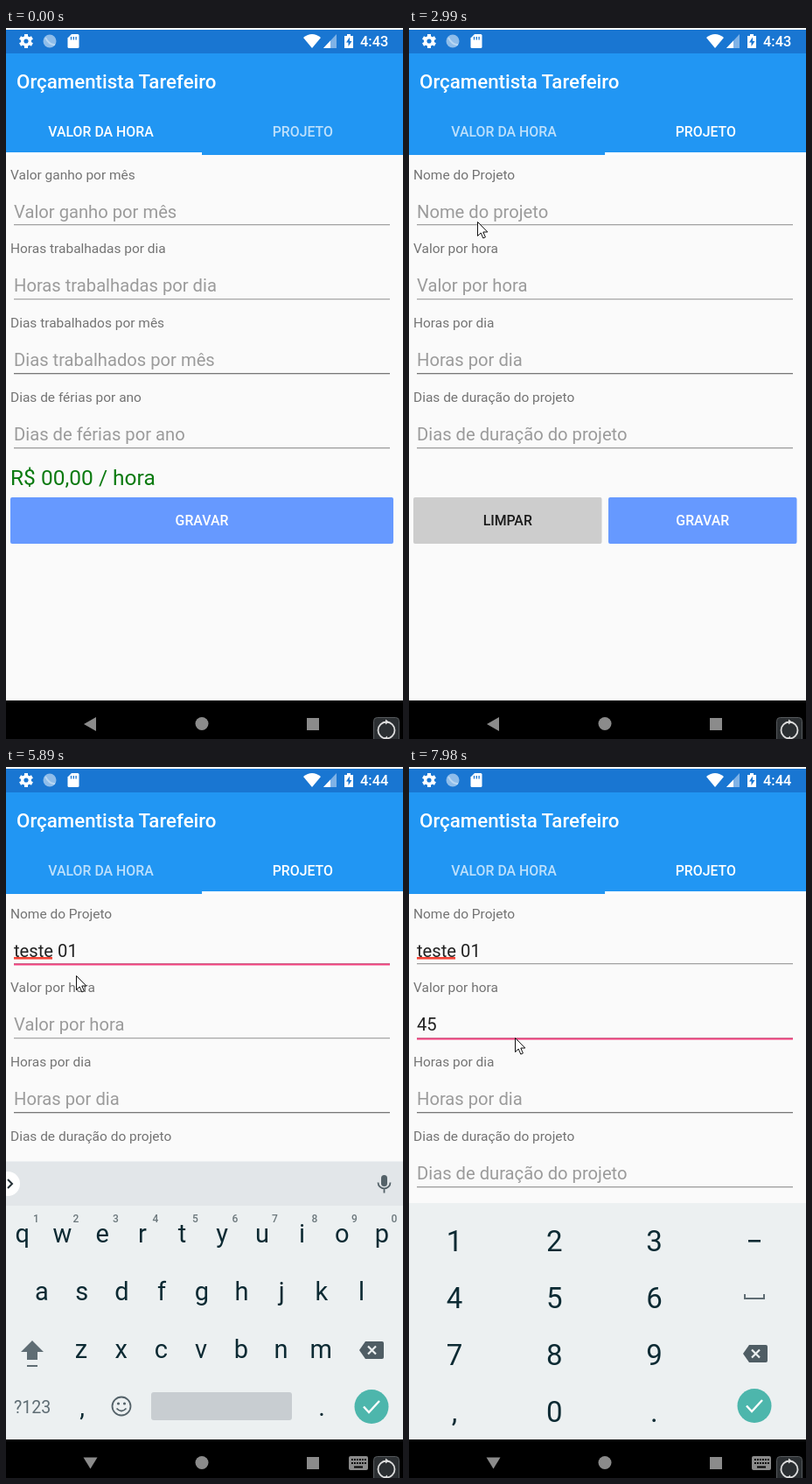
An HTML page for the animation above (8 s loop, 454 by 812 pixels).

```html
<!DOCTYPE html>
<html lang="pt">
<head>
<meta charset="utf-8">
<title>Orçamentista Tarefeiro</title>
<style>
html, body { margin: 0; width: 100%; height: 100%; overflow: hidden; background: #fafafa; }
svg { display: block; }
text { font-family: Roboto, sans-serif; white-space: pre; }
.med { font-weight: 500; font-size: 15.85px; }
.mid { text-anchor: middle; }
.label { font-size: 15.47px; fill: #737373; }
.hint { font-size: 20.2px; fill: #9b9b9b; }
.typed { font-size: 20.2px; fill: #212121; }
.key { font-size: 29px; fill: #0c2a33; }
.digit { font-size: 33px; fill: #0c2a33; }
.sup { font-size: 12px; font-weight: 500; fill: #6b777c; }
</style>
</head>
<body>
<svg id="stage" width="454" height="812" viewBox="0 0 454 812"></svg>
<script>
const rect = (x, y, w, h, fill, more = '') =>
  `<rect x="${x}" y="${y}" width="${w}" height="${h}" fill="${fill}" ${more}/>`;
const circle = (x, y, r, fill, more = '') => `<circle cx="${x}" cy="${y}" r="${r}" fill="${fill}" ${more}/>`;
const path = (d, fill, more = '') => `<path d="${d}" fill="${fill}" ${more}/>`;
const line = (d, color, w = 2, more = '') => path(d, 'none', `stroke="${color}" stroke-width="${w}" ${more}`);
const text = (x, y, s, cls, more = '') => `<text x="${x}" y="${y}" class="${cls}" ${more}>${s}</text>`;
const group = (id, s) => `<g id="${id}">${s}</g>`;

const textY = i => Math.floor(i * 84.7);
const lineY = i => Math.round(i * 84.9);
const lineColors = ['#a3a3a3', '#a8a8a8', '#777', '#9c9c9c'];

function form(id, names, hints) {
  return names.map((s, i) =>
    text(5, 173 + textY(i), s, 'label') + text(9, 217 + textY(i), hints[i], 'hint', `id="${id}Hint${i}"`) +
    rect(9, 224 + lineY(i), 430, 1.3, lineColors[i])).join('');
}

const button = (x, w, s, fill, color) =>
  rect(x, 536, w, 53, fill, 'rx="2"') + text(x + w / 2, 568, s, 'med mid', `fill="${color}"`);

const erase = (x, y) =>
  path(`M${x - 14} ${y}l7-10h19q2 0 2 2v16q0 2-2 2h-19z`, '#4f5d64') +
  line(`M${x - 4} ${y - 4.5}l9 9m0-9l-9 9`, '#ecf0f1', 2.2);

const done = (x, y) =>
  circle(x, y, 19.5, '#4db6ac') + line(`M${x - 9} ${y}l6 6.5l12-13`, '#fff', 2.4);

function statusBar() {
  let gear = '';
  for (let a = 0; a < 360; a += 60)
    gear += rect(21, 7, 4, 5, '#fff', `transform="rotate(${a} 23 15)"`);
  return rect(0, 2, 454, 27, '#1976d2') + gear +
    circle(23, 15, 4.3, 'none', 'stroke="#fff" stroke-width="3.4"') +
    circle(50, 15, 7.5, '#8fbdea') + line('M45 11q5 9 11 8', '#b9d7f3', 2) +
    path('M75 7h7q1.5 0 1.5 1.5v13q0 1.5-1.5 1.5h-10q-1.5 0-1.5-1.5v-10z', '#fff') +
    line('M74.5 10v3.5m2.8-3.5v3.5m2.8-3.5v3.5', '#1976d2', 1.3) +
    path('M340 11q10-8 20 0l-10 12z', '#fff') +
    path('M378 7v16h-15z', '#7fb2e6') + path('M371 14.5v8.5h-8z', '#fff') +
    path('M390 7h4v2h3v14h-10v-14h3z', '#fff') + path('M393 10.5l-4 6h2.5v4.5l4-6h-2.5z', '#1976d2') +
    text(405, 21, '4:43', '', 'id="clock" font-size="16.4" font-weight="500" fill="#fff"');
}

function letters() {
  const row = (s, x, y) => [...s].map((c, i) => text(x + i * 45.7, y, c, 'key mid')).join('');
  const sups = [...'1234567890'].map((c, i) => text(34.5 + i * 45.5, 520, c, 'sup mid')).join('');
  return rect(0, 450, 454, 318, '#ecf0f1') + rect(0, 451, 454, 50, '#e2e6e9') +
    circle(2, 476, 14, '#fff') + line('M2 471l5 5l-5 5', '#263238') +
    text(74, 483, 'Suggest contact names? Tap for info.', '', 'id="tip" font-size="18" fill="#4db6ac"') +
    rect(429, 466, 7, 13, '#546269', 'rx="3.5"') +
    line('M425.5 474.5a7 7 0 0 0 14 0M432.5 481.5v5', '#546269', 1.8) +
    row('qwertyuiop', 18.7, 543) + sups + row('asdfghjkl', 41, 609) + row('zxcvbnm', 86, 675) +
    path('M30 655l13 13h-7v9h-12v-9h-7z', '#5f6d74') + rect(24, 683, 12, 2, '#5f6d74') + erase(418, 666) +
    text(9, 738, '?123', '', 'font-size="19.6" fill="#5f6d74"') + text(87, 741, ',', 'key mid') +
    circle(132, 730, 10.5, 'none', 'stroke="#546269" stroke-width="1.8"') +
    circle(128.5, 727, 1.6, '#546269') + circle(135.5, 727, 1.6, '#546269') +
    line('M126.5 732.5q5.500 6 11 0', '#546269', 1.8) +
    rect(166, 714, 161, 32, '#c8cdd1', 'rx="3"') + text(361, 741, '.', 'key mid') + done(418, 730.5);
}

function numbers() {
  const digits = [...'123456789,0.'].map((c, i) =>
    text(52 + i % 3 * 114.2, 553 + Math.floor(i / 3) * 65, c, 'digit mid')).join('');
  return rect(0, 498, 454, 270, '#ecf0f1') + digits + rect(388, 540, 14, 2.6, '#0c2a33') +
    line('M384 602v5h22v-5', '#5f6d74') + erase(396, 670) + done(395, 729.5);
}

function navBar() {
  let dots = '';
  for (let i = 0; i < 12; i++) dots += rect(395 + i % 6 * 3, 790 + Math.floor(i / 6) * 4, 1.8, 2, '#000');
  return rect(0, 768, 454, 44, '#000') +
    group('back', path('M103 787v16l-14-8z', '#8b8b8b')) +
    group('hide', path('M88.5 788.5h16l-8 13z', '#8b8b8b') +
      rect(392, 787, 22, 16, '#8b8b8b', 'rx="2"') + dots + rect(398, 798.5, 10, 2, '#000')) +
    circle(224, 794.5, 7.5, '#8b8b8b') + rect(344, 788, 14, 14, '#8b8b8b') +
    rect(420.5, 787.5, 29, 30, '#2b2f32', 'rx="4" stroke="#55595c"') +
    circle(435, 802, 9.5, 'none', 'stroke="#ddd" stroke-width="1.8"') +
    path('M434 789.500l4 3l-4 3zM436 808.500l-4 3l4 3z', '#ddd');
}

const hourFields = ['Valor ganho por mês', 'Horas trabalhadas por dia', 'Dias trabalhados por mês', 'Dias de férias por ano'];
const jobFields = ['Nome do Projeto', 'Valor por hora', 'Horas por dia', 'Dias de duração do projeto'];
const jobHints = ['Nome do projeto', ...jobFields.slice(1)];

document.getElementById('stage').innerHTML =
  '<clipPath id="tabClip"><path d="M224 91h230v54h-230z"/></clipPath>' +
  rect(0, 0, 454, 812, '#fafafa') +
  group('hourPage', form('hour', hourFields, hourFields) +
    text(5, 522, 'R$ 00,00 / hora', '', 'font-size="24.5" fill="#0b7a10"') +
    button(5, 438, 'GRAVAR', '#6699ff', '#fff')) +
  group('jobPage', form('job', jobFields, jobHints) +
    rect(9, 217, 44, 2.6, '#f44336', 'id="spell"') +
    text(9, 217 + textY(0), '', 'typed', 'id="name"') +
    text(9, 217 + textY(1), '', 'typed', 'id="rate"') +
    rect(9, 224.5, 430, 2, '#f4407f', 'id="focus"') + rect(9, 195, 2, 27, '#f4407f', 'id="caret"') +
    button(5, 215.5, 'LIMPAR', '#cdcdcd', '#1a1a1a') + button(228, 215.5, 'GRAVAR', '#6699ff', '#fff')) +
  rect(0, 28, 454, 117, '#2196f3') + statusBar() +
  text(12, 69, 'Orçamentista Tarefeiro', '', 'font-size="22.3" font-weight="500" fill="#fff"') +
  `<g id="ripple" clip-path="url(#tabClip)" fill-opacity=".09">${rect(224, 91, 230, 54, '#fff') + circle(347.5, 118, 79.5, '#fff')}</g>` +
  text(108.5, 124, 'VALOR DA HORA', 'med mid', 'id="hourTab" fill="#fff"') +
  text(339.3, 124, 'PROJETO', 'med mid', 'id="jobTab" fill="#fff"') +
  rect(0, 142, 224, 3, '#fff', 'id="bar"') +
  group('letters', letters()) + group('numbers', numbers()) + navBar() +
  `<g id="mouse">${path('M.5.5v16l3.7-3.5l2.6 6l2.6-1.1l-2.6-5.9h5z', '#fff', 'stroke="#111"')}</g>`;

const $ = id => document.getElementById(id);
const show = (id, on) => $(id).setAttribute('visibility', on ? 'inherit' : 'hidden');
const set = (id, attrs) => { for (const k in attrs) $(id).setAttribute(k, attrs[k]); };
const within = (t, a, b) => t >= a && t < b;
// Last value whose start time has passed
const at = (t, list) => list.reduce((v, [start, next]) => t >= start ? next : v, list[0][1]);

// start, end, steps, from x, y, to x, y
const moves = [
  [360, 900, 8, 332, 630, 351, 110],
  [2530, 2990, 7, 338, 114, 78, 221],
  [5890, 6420, 8, 80, 238, 121, 292],
  [7910, 7980, 2, 121, 300, 121, 309],
];
function mouseAt(t) {
  const [a, b, n, x0, y0, x1, y1] = moves.filter(m => t >= m[0]).pop() || moves[0];
  const k = Math.min(n - 1, Math.max(0, Math.floor((t - a) * (n - 1) / (b - a) + 1e-6)));
  const u = k / (n - 1), e = u * u * (3 - 2 * u);
  return [Math.round(x0 + (x1 - x0) * e), Math.round(y0 + (y1 - y0) * e)];
}

const nameSteps = [[0, ''], [4320, 't'], [4390, 'te'], [4560, 'tes'], [4880, 'test'], [4950, 'teste'],
  [5170, 'teste '], [5340, 'teste 0'], [5420, 'teste 01']];
const rateSteps = [[0, ''], [7210, '4'], [7360, '45']];

function draw(t) {
  const job = t >= 2300, second = t >= 6590;
  const name = at(t, nameSteps), rate = at(t, rateSteps);

  show('hourPage', !job);
  show('jobPage', job);
  set('jobPage', { transform: `translate(${t < 2380 ? 1 : 0} 0)` });
  show('ripple', within(t, 2300, 2380));
  set('hourTab', { 'fill-opacity': job ? .7 : 1 });
  set('jobTab', { 'fill-opacity': job ? 1 : .7 });
  set('bar', { x: at(t, [[0, 0], [2300, 166], [2380, 219], [2530, 224]]), width: job ? 231 : 224 });

  $('name').textContent = name;
  $('rate').textContent = rate;
  show('jobHint0', !name);
  show('jobHint1', !rate);
  show('spell', t >= 5170);

  const y = second ? lineY(1) : 0;
  const typed = $(second ? 'rate' : 'name');
  show('focus', t >= 3390);
  set('focus', { y: 224.5 + y });
  show('caret', within(t, 3390, 3540) || within(t, 3850, 5890) || within(t, 6590, 7910));
  set('caret', { x: 9 + typed.getComputedTextLength(), y: 195 + y });

  show('letters', within(t, 3850, 6820));
  show('tip', within(t, 3850, 4880));
  show('numbers', t >= 6820);
  show('back', t < 3540);
  show('hide', t >= 3540);
  $('clock').textContent = t < 5340 ? '4:43' : '4:44';

  show('mouse', t >= 360);
  set('mouse', { transform: `translate(${mouseAt(t)})` });
}

function tick() {
  draw(performance.now() % 8000);
  requestAnimationFrame(tick);
}
tick();
</script>
</body>
</html>
```
